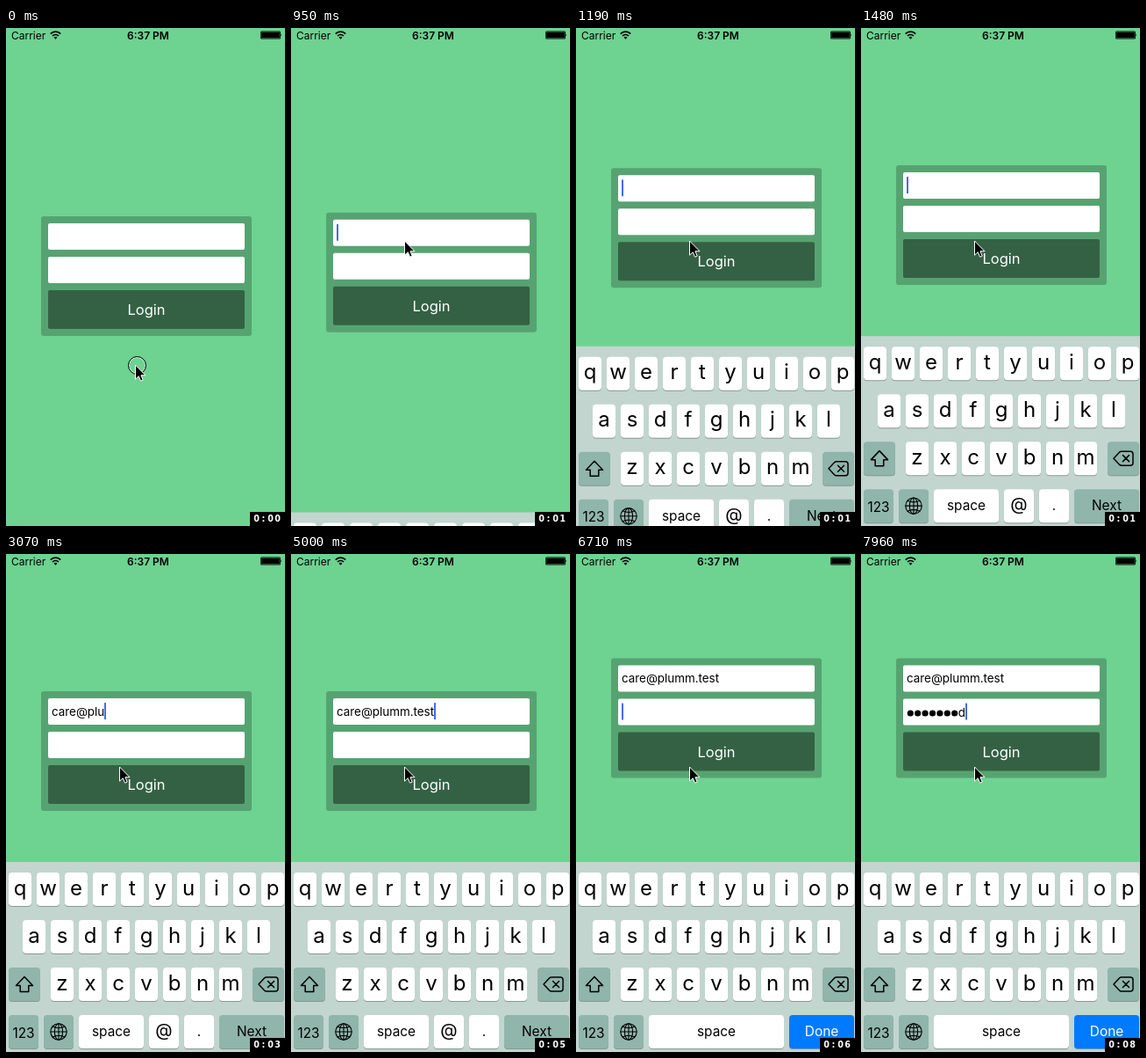
An HTML page for the animation above (8 s loop, 318 px wide and 566 px high).

```html
<!DOCTYPE html>
<html lang="en">
<head>
<meta charset="utf-8">
<title>Login form</title>
<style>
  html, body { margin: 0; width: 100%; height: 100%; overflow: hidden; background: #6ed291; }
  svg { display: block; width: 318px; height: 566px; font-family: Inter, Roboto, sans-serif; }
  .mid { text-anchor: middle; }
  .line { fill: none; stroke: #000; stroke-width: 1.5; stroke-linejoin: round; stroke-linecap: round; }
</style>
</head>
<body>
<svg viewBox="0 0 318 566">
  <rect width="318" height="566" fill="#6ed291"/>

  <g id="status">
    <text x="6" y="12.5" font-size="12">Carrier</text>
    <g fill="none" stroke="#000" stroke-width="1.7">
      <path d="M50.8 6.6a8 8 0 0 1 11.4 0M53 9a5 5 0 0 1 7 0"/>
    </g>
    <path d="M54.6 10.7a2.7 2.7 0 0 1 3.8 0L56.5 12.7z"/>
    <text class="mid" x="162" y="12.5" font-size="12" font-weight="600">6:37 PM</text>
    <rect x="290" y="3.5" width="23" height="9" rx="1.5"/>
    <rect x="291" y="4.5" width="21" height="7" rx=".5" stroke="#6ed291" stroke-width=".4"/>
    <path d="M313.4 6.3q1.4 1.7 0 3.4z"/>
  </g>

  <g id="panel">
    <rect x="40" width="240" height="136" rx="3" fill="#56a371"/>
    <rect x="48" y="8" width="224" height="30" rx="2" fill="#fff"/>
    <rect x="48" y="46" width="224" height="30" rx="2" fill="#fff"/>
    <rect x="48" y="84" width="224" height="44" rx="2" fill="#346144"/>
    <text class="mid" x="160" y="112" font-size="16.5" fill="#fff">Login</text>
    <text id="email" x="52" y="27.5" font-size="13.4"></text>
    <g id="dots"></g>
    <text id="lastChar" y="66" font-size="13.4"></text>
    <rect id="caret" width="2" height="19" rx=".5" fill="#426bf2"/>
  </g>

  <g id="keyboard">
    <rect width="318" height="216" fill="#c2d5cf"/>
    <g id="keys"></g>
    <g id="emailKeys"></g>
    <g id="passwordKeys"></g>
    <g class="line">
      <path d="M21 130.5L30.5 140.5H25.8V147.5H16.2V140.5H11.5Z"/>
      <path d="M288 139L294.5 132Q295.500 131 297 131H307Q310 131 310 134V144Q310 147 307 147H297Q295.500 147 294.5 146ZM298.500 135.500l7 7m0 -7l-7 7"/>
      <g stroke-width="1.1">
        <circle cx="60" cy="193" r="9.2"/>
        <ellipse cx="60" cy="193" rx="4.6" ry="9.2"/>
        <path d="M60 184v18M51 193h18M53 187q7 3.500 14 0M53 199q7 -3.500 14 0"/>
      </g>
    </g>
  </g>

  <g id="pointer">
    <g id="touch" fill="none">
      <circle cx="2.5" cy=".5" r="9" stroke="#fff" stroke-opacity=".7"/>
      <circle cx="2.5" cy=".5" r="10" stroke="#000"/>
    </g>
    <path d="M.5 0V16.200L4.200 12.700L6.600 18.200L9.200 17.100L6.900 11.700H12Z" stroke="#fff" stroke-width="1"/>
  </g>

  <rect x="278" y="550" width="40" height="16"/>
  <g id="clock" class="mid" fill="#fff" font-family="'DejaVu Sans', sans-serif" font-weight="700" font-size="9.6"></g>
</svg>

<script>
const LOOP = 8000;
const EMAIL = "care@plumm.test";
const PASSWORD = "password";
const EMAIL_TIMES = [1600, 1780, 2060, 2240, 2480, 2710, 2890, 3070,
  3830, 4060, 4230, 4590, 4770, 4890, 5000];
const PASSWORD_TIMES = [6890, 7010, 7190, 7310, 7490, 7610, 7780, 7900];
const FOCUS_EMAIL = 926, FOCUS_PASSWORD = 5300;
const DOT_PITCH = 8.4;

const byId = id => document.getElementById(id);

function add(parent, tag, attributes, text = "") {
  const node = document.createElementNS("http://www.w3.org/2000/svg", tag);
  for (const name in attributes) node.setAttribute(name, attributes[name]);
  node.textContent = text;
  return parent.appendChild(node);
}

function addKey(parent, x, y, width, label = "", { fill = "#fff", size = 15.4, base = 24, color = "#000" } = {}) {
  add(parent, "rect", { x, y: y + 1, width, height: 38, rx: 4, fill: "#879891" });
  add(parent, "rect", { x, y, width, height: 38, rx: 4, fill });
  add(parent, "text", { class: "mid", x: x + width / 2, y: y + base, "font-size": size, fill: color }, label);
}

function buildKeyboard() {
  const keys = byId("keys"), emailKeys = byId("emailKeys"), passwordKeys = byId("passwordKeys");
  const dark = { fill: "#90b5aa" };
  [["qwertyuiop", 3], ["asdfghjkl", 19], ["zxcvbnm", 51]].forEach(([letters, left], row) =>
    [...letters].forEach((letter, i) =>
      addKey(keys, left + i * 32, 12 + row * 54, 26, letter, { size: 24, base: 25.5 })));
  addKey(keys, 3, 120, 36, "", dark);
  addKey(keys, 281, 120, 36, "", dark);
  addKey(keys, 3, 174, 34, "123", { ...dark, base: 25.5 });
  addKey(keys, 43, 174, 34, "", dark);
  addKey(emailKeys, 83, 174, 74, "space");
  addKey(emailKeys, 163, 174, 34, "@", { size: 20 });
  addKey(emailKeys, 203, 174, 34, ".");
  addKey(emailKeys, 243, 174, 74, "Next", dark);
  addKey(passwordKeys, 83, 174, 154, "space");
  addKey(passwordKeys, 243, 174, 74, "Done", { fill: "#007aff", color: "#fff" });
}

buildKeyboard();
const dots = [...PASSWORD].map((_, i) =>
  add(byId("dots"), "circle", { cx: 56.3 + i * DOT_PITCH, cy: 62.5, r: 3.6 }));
const digits = [285.5, 293.5, 301.5, 309.5].map(x => add(byId("clock"), "text", { x, y: 561 }));

const ramp = (t, from, to) => Math.min(1, Math.max(0, (t - from) / (to - from)));
const smooth = u => u * u * (3 - 2 * u);
const typedCount = (times, t) => times.filter(time => time <= t).length;
const move = (id, x, y) => byId(id).setAttribute("transform", `translate(${x} ${y})`);
const show = (node, visible) => node.setAttribute("visibility", visible ? "visible" : "hidden");

// Critically damped spring, as used for the keyboard slide.
function spring(t) {
  const u = Math.max(0, t) * 0.0175;
  return 1 - (1 + u) * Math.exp(-u);
}

function caretOpacity(t) {
  if (t < FOCUS_EMAIL) return 0;
  if (t < EMAIL_TIMES[8]) return 1 - ramp(t, 3580, 3690);
  return 1 - ramp(t, 6100, 6290) + ramp(t, 6570, 6710);
}

function drawFields(t) {
  const email = byId("email"), last = byId("lastChar"), caret = byId("caret");
  const onPassword = t >= FOCUS_PASSWORD;
  const count = typedCount(PASSWORD_TIMES, t);
  const lastX = 52 + Math.max(0, count - 1) * DOT_PITCH;

  email.textContent = EMAIL.slice(0, typedCount(EMAIL_TIMES, t));
  dots.forEach((dot, i) => show(dot, i < count - 1));
  last.textContent = count ? PASSWORD[count - 1] : "";
  last.setAttribute("x", lastX);

  const end = onPassword
    ? lastX + (count ? last.getComputedTextLength() : 0)
    : 52 + (email.textContent ? email.getComputedTextLength() : 0);
  caret.setAttribute("x", Math.round(end));
  caret.setAttribute("y", onPassword ? 51 : 13);
  caret.setAttribute("opacity", caretOpacity(t));
}

function draw(t) {
  const rise = spring(t - FOCUS_EMAIL);
  const shift = smooth(ramp(t, 5335, 5585));
  move("panel", 0, 214 - 58 * rise - 37.5 * shift);
  move("keyboard", 0, 566 - 216 * rise);
  show(byId("emailKeys"), t < FOCUS_PASSWORD);
  show(byId("passwordKeys"), t >= FOCUS_PASSWORD);
  drawFields(t);

  const travel = smooth(ramp(t, 310, 760));
  move("pointer", 147 - 18 * travel, 383 - 141 * travel);
  show(byId("touch"), t < 50 || (t >= 790 && t < 910));

  const seconds = Math.floor((t + 60) / 1000);
  [..."0:0" + seconds].forEach((char, i) => digits[i].textContent = char);
}

function tick() {
  draw(performance.now() % LOOP);
  requestAnimationFrame(tick);
}
tick();
</script>
</body>
</html>
```
